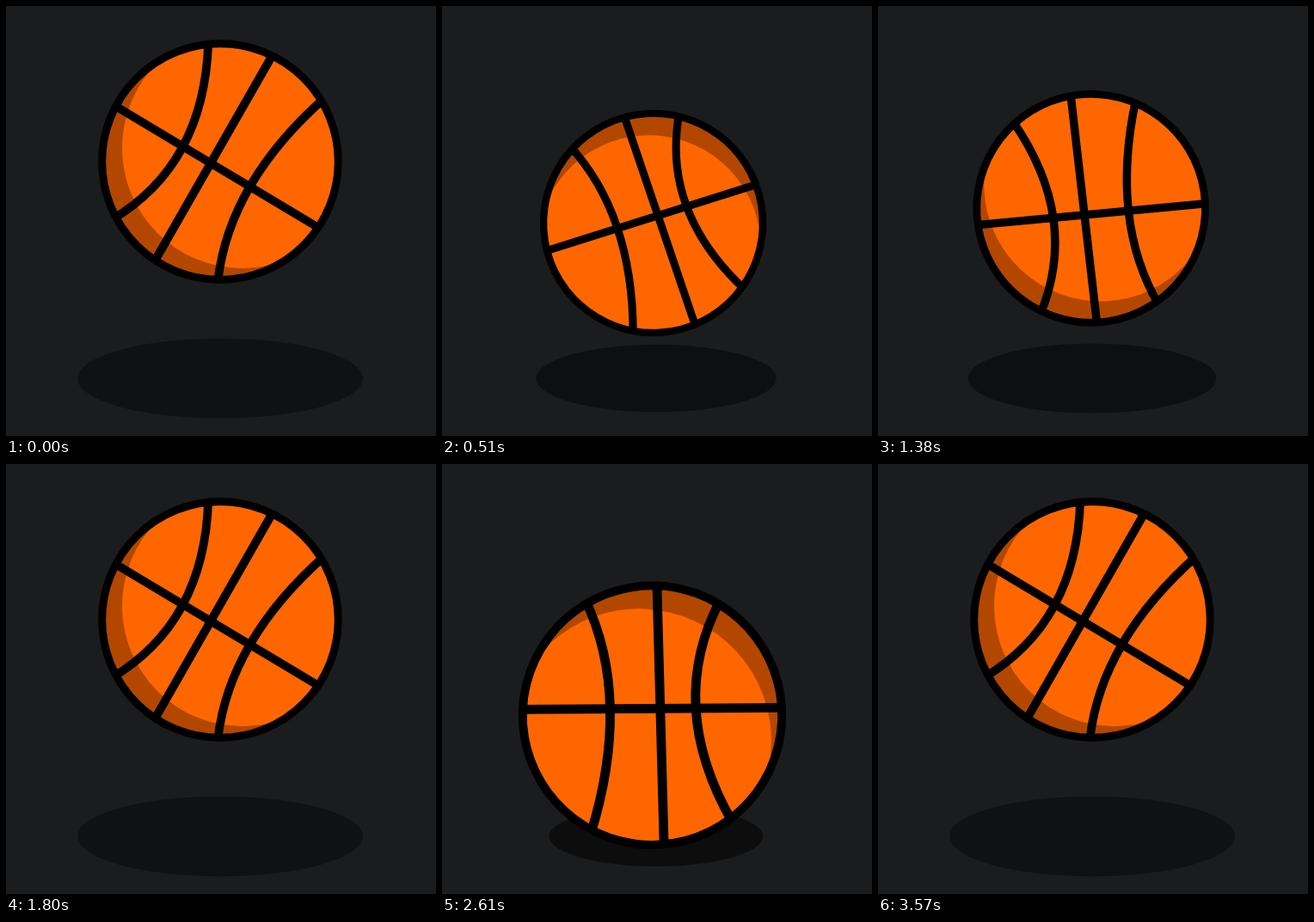
Write an HTML page that moves like this. It is 500 by 500 pixels and loops after 3630 ms.

```html
<!DOCTYPE html>
<html lang="en">
<head>
<meta charset="utf-8">
<title>Bouncing basketball</title>
<style>
  html, body { margin: 0; width: 100%; height: 100%; overflow: hidden; background: #1b1c1e; }
  svg { display: block; width: 100%; height: 100%; }
</style>
</head>
<body>
<svg viewBox="0 0 500 500">
  <defs>
    <clipPath id="disc"><circle r="137.3"/></clipPath>
  </defs>
  <ellipse id="shadow" rx="166" ry="46.5"/>
  <g id="ball">
    <g transform="translate(2.7 -1.3)">
      <g clip-path="url(#disc)">
        <circle r="137.3" fill="#b34700"/>
        <circle cx="26" cy="-16" r="140" fill="#ff6600"/>
        <g fill="none" stroke="#000" stroke-width="9.8">
          <path d="M-128 -68.4L122 81.4"/>
          <path d="M63 -127.8L-79 120.8"/>
          <path d="M-13.7 -141Q-17.5 3 -126 67.5"/>
          <path d="M122 -74.5Q9 25.5 -3 142"/>
        </g>
      </g>
      <circle r="137.3" fill="none" stroke="#000" stroke-width="9"/>
    </g>
  </g>
</svg>
<script>
const LOOP = 3630, STEP = 30;
const BOUNCE = 1800, FALL = 900, END = 3570;
const ball = document.getElementById('ball');
const shadow = document.getElementById('shadow');

// Cubic bezier (1/6, 1/6, 2/3, 1): steady start, soft landing
function ease(x) {
  const curve = (t, a, b) => 3 * (1 - t) ** 2 * t * a + 3 * (1 - t) * t * t * b + t ** 3;
  let low = 0, high = 1;
  for (let i = 0; i < 30; i++) {
    const mid = (low + high) / 2;
    if (curve(mid, 1 / 6, 2 / 3) < x) low = mid; else high = mid;
  }
  return curve(low, 1 / 6, 1);
}

function draw(time) {
  const t = Math.min(Math.floor(time % LOOP / STEP) * STEP, END);
  const first = t < BOUNCE;
  const direction = first ? 1 : -1;
  const length = first ? BOUNCE : END - BOUNCE;
  const local = first ? t : t - BOUNCE;

  const falling = local < FALL;
  const half = falling ? local / FALL : (local - FALL) / (length - FALL);
  const drop = falling ? half : 1 - half;
  const depth = falling ? ease(half) : 1 - ease(half);

  const y = 182.3 + 119 * drop;
  const angle = direction * 360 * ease(local / length);
  const scale = 1 - direction * 0.1 * depth;
  ball.setAttribute('transform', `translate(246.3 ${y}) rotate(${angle}) scale(${scale})`);

  shadow.setAttribute('transform', `translate(249 433) scale(${1 - 0.278 * drop})`);
  shadow.setAttribute('fill-opacity', 0.4 + 0.14 * drop);
}

const start = performance.now();
function tick() {
  draw(performance.now() - start);
  requestAnimationFrame(tick);
}
tick();
</script>
</body>
</html>
```
